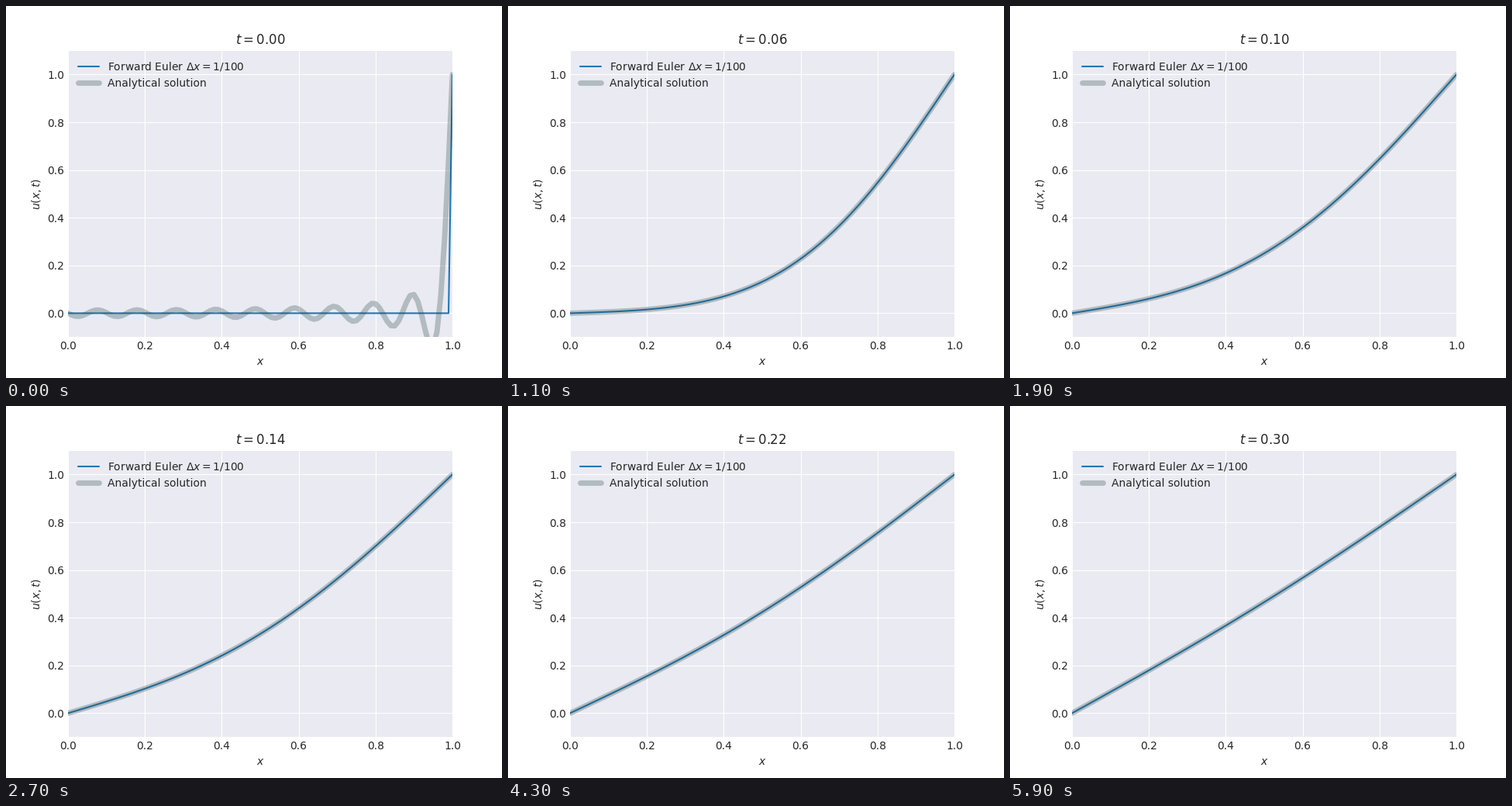
A matplotlib script that plays this animation: 640 px wide and 480 px high, repeating every 6 s.

```python
import matplotlib.pyplot as plt
import numpy as np
from matplotlib.animation import FuncAnimation

plt.style.use("seaborn-v0_8-darkgrid")
plt.rcParams["font.family"] = "DejaVu Sans"

FRAMES = 60
STEPS_PER_FRAME = 100
TERMS = 19

dx = 1 / 100
dt = 0.5 * dx**2
x = np.linspace(0, 1, 101)


def forward_euler():
    """Return the numerical solution for every frame."""
    u = np.zeros_like(x)
    u[-1] = 1
    r = dt / dx**2
    states = [u.copy()]
    for _ in range(FRAMES - 1):
        for _ in range(STEPS_PER_FRAME):
            u[1:-1] += r * (u[2:] - 2 * u[1:-1] + u[:-2])
        states.append(u.copy())
    return states


def analytical(t):
    """Truncated Fourier series of the heat equation."""
    n = np.arange(1, TERMS + 1)[:, None]
    modes = 2 / (n * np.pi) * (-1.0) ** n * np.sin(n * np.pi * x)
    return x + (modes * np.exp(-((n * np.pi) ** 2) * t)).sum(axis=0)


states = forward_euler()

fig, ax = plt.subplots(figsize=(6.4, 4.8), dpi=100)
euler_line, = ax.plot([], [], color="#1f77b4", lw=1.5,
                      label=r"Forward Euler $\Delta x = 1/100$")
exact_line, = ax.plot([], [], color="darkslategray", lw=5, alpha=0.3,
                      label="Analytical solution")
ax.set_xlim(0, 1)
ax.set_ylim(-0.1, 1.1)
ax.set_xlabel("$x$")
ax.set_ylabel("$u(x,t)$")
ax.legend(loc="upper left")
title = ax.set_title("$t=0.00$")


def update(i):
    # The series is evaluated one step ahead of the numerical state.
    t = (i * STEPS_PER_FRAME + 1) * dt
    euler_line.set_data(x, states[i])
    exact_line.set_data(x, analytical(t))
    title.set_text(f"$t={t:.2f}$")
    return euler_line, exact_line, title


anim = FuncAnimation(fig, update, frames=FRAMES, interval=100,
                     repeat=True, repeat_delay=0, blit=False)
plt.show()
```
